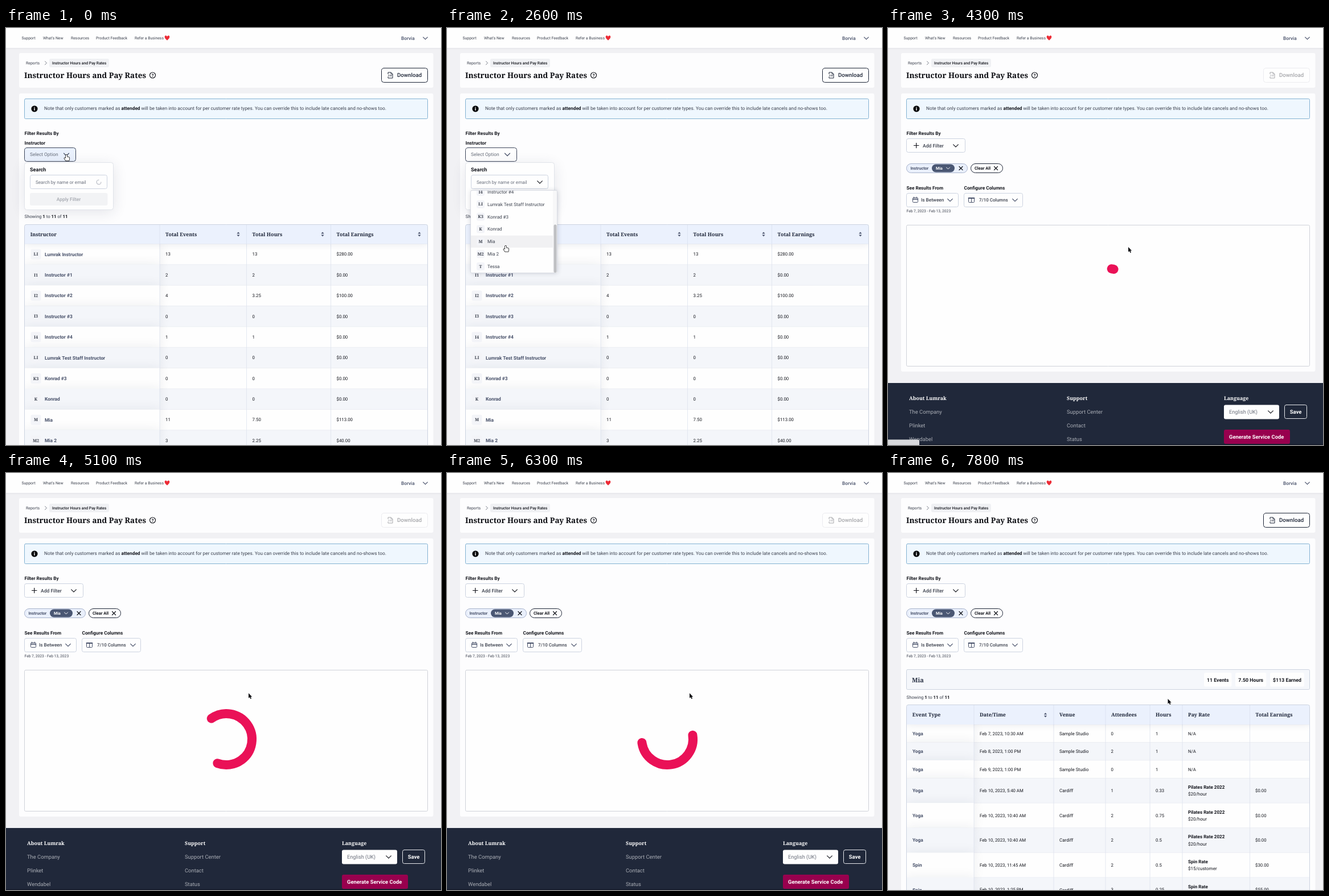
Animation, 764 px wide and 733 px high, one loop 7900 ms. Source, as an HTML page with a canvas:

```html
<!DOCTYPE html>
<html lang="en">
<head>
<meta charset="utf-8">
<title>Instructor Hours and Pay Rates</title>
<style>
html, body { margin: 0; width: 100%; height: 100%; overflow: hidden; background: #f1f1f4; }
canvas { display: block; width: 764px; height: 733px; }
</style>
</head>
<body>
<canvas id="stage" width="764" height="733"></canvas>
<script>
const c = document.getElementById('stage').getContext('2d');
c.textRendering = 'geometricPrecision';
c.lineCap = c.lineJoin = 'round';

const LOOP = 7900, PAGE = 4200, DONE = 6900;
const INK = '#14161d', SOFT = '#3b404d', SLATE = '#475069', NAVY = '#1c2436', EDGE = '#ccd3e0', STRIPE = '#f4f6fa';
const PICK = 'Mia';

const smooth = x => x * x * (3 - 2 * x);
const clamp = x => Math.max(0, Math.min(1, x));

// --- drawing helpers; y is the middle of the capitals ---
function text(s, x, y, size = 8, color = INK, weight = 400, align = 'left', family = 'Roboto, sans-serif') {
  c.font = `${weight} ${size}px ${family}`;
  c.fillStyle = color;
  c.textAlign = align;
  c.fillText(s, x, y + size * .355);
  return c.measureText(s).width;
}
const slab = (s, x, y, size = 8.9, color = INK, align, weight = 700) =>
  text(s, x, y, size, color, weight, align, '"Noto Serif", serif');

// Parts alternate between regular and bold.
function rich(parts, x, y, size) {
  parts.forEach((s, i) => x += text(s, x, y, size, i % 2 ? INK : SOFT, i % 2 ? 700 : 400));
}
// Outlined boxes sit on pixel centres so that their edges stay crisp.
function box(x, y, x2, y2, fill, edge, r = 3) {
  if (edge) [x, y, x2, y2] = [x, y, x2, y2].map(v => Math.ceil(v) - .5);
  c.beginPath();
  c.roundRect(x, y, x2 - x, y2 - y, r);
  if (fill) { c.fillStyle = fill; c.fill(); }
  if (edge) { c.strokeStyle = edge; c.lineWidth = 1; c.stroke(); }
}
function shadowed(blur, alpha, draw, drop = 0) {
  c.save();
  c.shadowColor = `rgba(30,40,70,${alpha})`;
  c.shadowBlur = blur;
  c.shadowOffsetY = drop;
  draw();
  c.restore();
}
function line(points, color = INK, width = 1.2) {
  c.beginPath();
  points.forEach(([x, y]) => c.lineTo(x, y));
  c.strokeStyle = color;
  c.lineWidth = width;
  c.stroke();
}
function arc(x, y, r, from, to, color, width) {
  c.beginPath();
  c.arc(x, y, r, from, to);
  c.strokeStyle = color;
  c.lineWidth = width;
  c.stroke();
}
const chevron = (x, y, w = 4.3, color = INK, width) =>
  line([[x - w, y - w / 2], [x, y + w / 2], [x + w, y - w / 2]], color, width);
function cross(x, y, r = 3) {
  line([[x - r, y - r], [x + r, y + r]]);
  line([[x + r, y - r], [x - r, y + r]]);
}
function sortIcon(x, y) {
  c.fillStyle = SLATE;
  for (const d of [-1, 1]) {
    c.beginPath();
    c.moveTo(x - 2.6, y + d);
    c.lineTo(x + 2.6, y + d);
    c.lineTo(x, y + d * 4);
    c.fill();
  }
}

// Striped rows whose first cell and header float above the rest.
function grid(top, heights, dividers, heads) {
  const head = top + 34, right = dividers[0];
  const rows = heights.map((h, i) => [head + heights.slice(0, i).reduce((a, b) => a + b, 0), h, i % 2 ? STRIPE : '#fefefe']);
  c.save();
  c.beginPath();
  c.rect(33, top, 707.5, 733 - top);
  c.clip();
  for (const [y, h, fill] of rows) {
    box(33, y, 741, y + h, fill, null, 0);
    line([[33, y], [741, y]], '#e6e9ef', .7);
  }
  for (const [y, h, fill] of rows) shadowed(20, .08, () => box(33, y, right, y + h, fill, null, 0));
  for (const x of dividers) line([[x, head], [x, 733]], '#dde3ee', .8);
  shadowed(14, .1, () => box(33, top, 741, head, '#ebf1fd', null, [3, 3, 0, 0]));
  for (const x of dividers) line([[x, top], [x, head]], '#dae1ef', .8);
  c.restore();
  box(33, top, 741, 760, null, EDGE);
  heads.forEach((s, k) => slab(s, k ? dividers[k - 1] + 10 : 42.7, top + 17.2, 8.85, NAVY));
  return rows.map(([y, h]) => y + h / 2);
}

// --- parts common to all screens ---
function frameTop(ready, cardEnd) {
  c.fillStyle = '#f1f1f4';
  c.fillRect(0, 0, 764, 733);
  shadowed(4, .12, () => { c.fillStyle = '#fefefe'; c.fillRect(-9, -9, 782, 44); });
  [['Support', 27.5], ["What's New", 65], ['Resources', 114], ['Product Feedback', 158], ['Refer a Business', 226]]
    .forEach(([s, x]) => text(s, x, 17.5, 6.85, SOFT));
  c.fillStyle = '#ed2b36';
  c.beginPath();
  c.moveTo(283, 21.8);
  c.bezierCurveTo(275, 16, 280, 10.5, 283, 15);
  c.bezierCurveTo(286, 10.5, 291, 16, 283, 21.8);
  c.fill();
  text('Borvia', 694, 18, 8.3, SLATE, 500);
  chevron(736.5, 18, 3.8, SLATE);

  box(23, 44, 750.5, 105, '#fdfdfe');
  box(23, 115, 750.5, cardEnd, '#fdfdfe');
  text('Reports', 35, 61.5, 6.95, SOFT);
  line([[68.5, 58.5], [71.5, 61.5], [68.5, 64.5]], '#777c88', 1);
  box(76, 54, 181, 69, '#f0f1f4');
  text('Instructor Hours and Pay Rates', 81, 61.5, 6.85, INK, 500);
  slab('Instructor Hours and Pay Rates', 32, 83.5, 13.5, '#0a0b10');
  arc(257.5, 83, 5, 0, 7, INK, 1.2);
  text('?', 257.5, 83.2, 7.5, INK, 700, 'center');

  const tone = ready ? NAVY : '#a6a7ab';
  box(659.5, 71, 741, 95.5, '#fefefe', ready ? NAVY : '#ececf0', 4);
  line([[671, 81], [671, 78], [676, 78], [679, 81], [679, 88], [671, 88], [671, 86]], tone, 1);
  line([[676, 78], [676, 81], [679, 81]], tone, .8);
  text('CSV', 674.5, 84, 3.6, tone, 700, 'center');
  text('Download', 687, 83, 9.7, tone, 500);

  box(33, 124.5, 741, 159.5, '#eff7fe', '#83b2d2', 2);
  c.fillStyle = '#050608';
  c.beginPath();
  c.arc(50, 142, 5.6, 0, 7);
  c.fill();
  text('i', 50, 142, 8.5, '#fff', 900, 'center');
  rich(['Note that only customers marked as ', 'attended',
    ' will be taken into account for per customer rate types. You can override this to include late cancels and no-shows too.'],
    67, 141, 8.29);
  text('Filter Results By', 32.5, 185, 8.2, INK, 700);
}
const showing = y => rich(['Showing ', '1', ' to ', '11', ' of ', '11'], 32.5, y, 7.8);

// --- first screen: all instructors ---
const people = ['Lumrak Instructor', 'Instructor #1', 'Instructor #2', 'Instructor #3', 'Instructor #4',
  'Lumrak Test Staff Instructor', 'Konrad #3', 'Konrad', PICK, PICK + ' 2', 'Tessa'];
const initials = ['LI', 'I1', 'I2', 'I3', 'I4', 'LI', 'K3', 'K', 'M', 'M2', 'T'];
const totals = ['13 13 $280.00', '2 2 $0.00', '4 3.25 $100.00', '0 0 $0.00', '1 1 $0.00',
  '0 0 $0.00', '0 0 $0.00', '0 0 $0.00', '11 7.50 $113.00', '3 2.25 $40.00'];

function badge(i, x, y, size = 18) {
  box(x - size / 2, y - size / 2, x + size / 2, y + size / 2, '#f3f4f8');
  slab(initials[i], x, y, 7.4, SOFT, 'center');
}

function instructorTable() {
  showing(331.5);
  const dividers = [270, 422.5, 570.5];
  const rows = grid(345.5, totals.map(() => 36.37), dividers,
    ['Instructor', 'Total Events', 'Total Hours', 'Total Earnings']);
  for (const x of [408, 556, 726]) sortIcon(x, 362.5);
  rows.forEach((y, i) => {
    badge(i, 52.5, y);
    text(people[i], 68, y, 8.4, SLATE, 600);
    totals[i].split(' ').forEach((s, k) => text(s, dividers[k] + 10, y, 7.85));
  });
}

function filterPanel(t, open, picked, pointer) {
  text('Instructor', 32.5, 202, 8.3, INK, 700);
  box(33, 210.5, 122.5, 234.5, t < 900 ? '#eaf1fd' : '#fefefe', '#3d465b', 4);
  text('Select Option', 42, 222.5, 8.4, '#676d7a');
  chevron(106, 222.5, 4.5, SLATE);

  shadowed(24, .12, () => box(33, 237, 188.5, 319.5, '#fefefe', null, 4), 4);
  box(33, 237, 188.5, 319.5, null, '#e1e4ea', 4);
  text('Search', 42, 249, 9.1, INK, 700);
  box(42.5, 259, 178, 283, '#fefefe', EDGE);
  if (picked) {
    badge(8, 59, 271, 13);
    text(PICK, 71, 271, 8.2, SOFT);
    cross(163, 271, 3.2);
  } else {
    text('Search by name or email', 52, 271, 8.1, '#696f7c');
    if (t < 1200) arc(163, 271, 3.9, t / 110, t / 110 + 4.7, '#a9adb8', 1);
    else chevron(163, 271, 4.3);
  }
  box(42, 290, 178.5, 312, picked ? '#020c22' : '#f2f3f5');
  text('Apply Filter', 110, 301, 8.45, picked ? '#fff' : '#a5a8b0', 500, 'center');
  if (open) optionList(t, pointer);
}

function optionList(t, pointer) {
  const scroll = smooth(clamp((t - 1700) / 700));
  shadowed(8, .2, () => box(42, 286, 194, 431, '#fefefe', null, 2));
  c.save();
  c.beginPath();
  c.rect(42, 286, 152, 145);
  c.clip();
  people.forEach((name, i) => {
    const y = 298.7 + i * 21.83 - scroll * 98;
    if (Math.abs(y - pointer) < 10.9) box(42, y - 10.7, 186, y + 10.7, '#f1f1f3', null, 0);
    badge(i, 59, y, 14);
    text(name, 71, y, 8.1, SOFT);
  });
  box(186, 286, 194, 431, '#f7f7f8', null, 0);
  box(187.5, 286.5 + scroll * 59, 192.5, 371 + scroll * 59, '#bfc0c3', null, 2.5);
  c.restore();
  box(42, 286, 194, 431, null, '#d9dce3', 2);
}

// --- second screen: filter chosen ---
function filterBar() {
  box(33, 194.5, 135.5, 218.5, '#fefefe', EDGE);
  line([[45.5, 206.5], [54, 206.5]]);
  line([[49.7, 202.3], [49.7, 210.7]]);
  text('Add Filter', 61, 207, 8.5, SOFT, 500);
  chevron(119, 207, 4.3);

  box(33, 238.5, 139.5, 254.5, '#eaf0fc', '#a7b2cb', 8);
  text('Instructor', 39.5, 246.5, 7.2, SLATE, 700);
  box(77, 239.5, 117, 253.5, '#4a5773', null, 7);
  text(PICK, 84, 246.5, 7, '#fff', 700);
  chevron(105.5, 246.5, 3, '#fff', 1);
  cross(128, 246.5);
  box(145.5, 238.5, 201.5, 254.5, '#fefefe', NAVY, 8);
  text('Clear All', 152, 246.5, 7.4, INK, 700);
  cross(189.5, 246.5);

  text('See Results From', 32.5, 281, 8.2, INK, 700);
  text('Configure Columns', 133.5, 281, 8.3, INK, 700);
  box(33, 290.5, 123.5, 314.5, '#fefefe', EDGE);
  box(43.5, 298.5, 52.5, 306.5, null, SLATE, 1);
  line([[43.5, 301], [52.5, 301]], SLATE, 1.5);
  for (const x of [45.5, 50.5]) line([[x, 296.8], [x, 299]], SLATE, 1);
  text('Is Between', 58, 302.5, 8.2, SOFT, 500);
  chevron(109, 302.5, 4.3, SLATE);
  box(133.5, 290.5, 236.5, 314.5, '#fefefe', EDGE);
  box(141.5, 298.5, 152, 306.5, null, SLATE, 1);
  line([[141.5, 299], [151.5, 299]], SLATE, 1.8);
  line([[146.5, 299], [146.5, 306]], SLATE, 1);
  text('7/10 Columns', 160, 302.5, 8, SOFT, 500);
  chevron(223, 302.5, 4.3, SLATE);
  text('Feb 7, 2023 - Feb 13, 2023', 32.5, 322, 6.7, SOFT);
}

function loader(t) {
  const s = (t - 4270) / 1000;
  if (s < 0) return;
  const half = s / .76 % 2, grow = smooth(Math.min(half, 1)), fall = smooth(Math.max(half - 1, 0));
  const base = -88 + 142.6 * s, rad = Math.PI / 180;
  const tail = base + 200 * grow + 160 * fall, head = base + 4 + 438 * grow - 80 * fall;
  arc(387, 468, 45, tail * rad, Math.max(head, tail + 2) * rad, '#ea1157', 16);
}

function footer() {
  c.fillStyle = '#20283a';
  c.fillRect(0, 624, 764, 109);
  c.fillStyle = '#141a2a';
  c.fillRect(0, 731.5, 764, 2);
  const cols = [[37, 'About Lumrak', 'The Company', 'Plinket', 'Wendabel'],
    [314, 'Support', 'Support Center', 'Contact', 'Status']];
  for (const [x, title, ...links] of cols) {
    slab(title, x, 651, 8.9, '#fff');
    links.forEach((s, i) => text(s, x, 675 + i * 24, 9.4, '#a9adb5'));
  }
  slab('Language', 590, 651, 8.9, '#fff');
  box(590, 662.5, 687, 687.5, '#fefefe');
  text('English (UK)', 599, 675, 9.2, '#6a6f7b');
  chevron(672, 675, 4.3);
  box(697, 663, 736, 687, null, '#e6e8ec');
  text('Save', 716, 675, 9.5, '#fff', 700, 'center');
  box(590, 706, 706, 731, '#98004e');
  text('Generate Service Code', 599, 718.5, 9.4, '#fff', 700);
}

// --- third screen: events of one instructor ---
const events = [
  ['Yoga', 'Feb 7, 2023, 10:30 AM', 0, '1'],
  ['Yoga', 'Feb 8, 2023, 1:00 PM', 2, '1'],
  ['Yoga', 'Feb 9, 2023, 1:00 PM', 0, '1'],
  ['Yoga', 'Feb 10, 2023, 5:40 AM', 1, '0.33', '$0.00'],
  ['Yoga', 'Feb 10, 2023, 10:40 AM', 2, '0.75', '$0.00'],
  ['Yoga', 'Feb 10, 2023, 10:40 AM', 2, '0.5', '$0.00'],
  ['Spin', 'Feb 10, 2023, 11:45 AM', 2, '0.5', '$30.00'],
  ['Spin', 'Feb 10, 2023, 1:25 PM', 3, '0.25', '$55.00']
];

function results() {
  box(33, 346, 741, 381, '#f5f7fb', EDGE, 2);
  slab(PICK, 42, 364, 11, '#2b3346', 'left', 600);
  [['11 Events', 555, 603.5], ['7.50 Hours', 610, 664.5], ['$113 Earned', 671, 731]].forEach(([s, x, x2]) => {
    box(x, 351, x2, 375.5, '#fefefe');
    text(s, (x + x2) / 2, 363.5, 8.8, INK, 700, 'center');
  });
  showing(394.5);
  const rows = grid(408, events.map(e => e[4] ? 43.6 : 31.5), [151, 291, 382, 460, 517, 635.5],
    ['Event Type', 'Date/Time', 'Venue', 'Attendees', 'Hours', 'Pay Rate', 'Total Earnings']);
  sortIcon(276.5, 425.5);
  events.forEach(([type, date, count, hours, earned], i) => {
    const y = rows[i], yoga = type === 'Yoga';
    text(type, 43, y, 8.3, SLATE, 700);
    text(date, 161, y, 7.8);
    text(earned ? 'Cardiff' : 'Sample Studio', 301, y, 8);
    text(count, 391.5, y, 7.8);
    text(hours, 470, y, 7.8);
    if (earned) {
      text(yoga ? 'Pilates Rate 2022' : 'Spin Rate', 527, y - 6, 8.1, INK, 700);
      text(yoga ? '$20/hour' : '$15/customer', 527, y + 6.3, 8);
      text(earned, 645, y, 7.8);
    } else text('N/A', 527, y, 7.8);
  });
}

// --- pointer ---
const path = [[0, 107, 228], [500, 107, 228], [1000, 140, 272], [1500, 138, 275], [1900, 106, 340], [2400, 104, 388],
  [3100, 104, 388], [3700, 101, 303], [4000, 101, 303], [4300, 422, 385], [4700, 426, 387], [6900, 426, 387], [7800, 491.5, 397]];

function pointerAt(t) {
  const i = path.findIndex(k => k[0] > t);
  if (i < 0) return path[path.length - 1].slice(1);
  const [t0, x0, y0] = path[i - 1], [t1, x1, y1] = path[i];
  const p = smooth((t - t0) / (t1 - t0));
  return [x0 + (x1 - x0) * p, y0 + (y1 - y0) * p];
}
const hand = new Path2D('M-2 1 V-4.5 Q-1-6 0-4.5 V-1.5 L3.5-.7 Q4.5-.3 4.4 1 L3.6 5 H-2 L-4.6 1.4 Q-4.4 0-3.2.5Z');
const arrow = new Path2D('M0 0 V8.8 L2 7 L3.5 10.2 L5 9.5 L3.6 6.4 H6.2Z');

function pointer(x, y, shape, fill, edge) {
  c.save();
  c.translate(x, y);
  c.fillStyle = fill;
  c.strokeStyle = edge;
  c.lineWidth = 1.5;
  c.stroke(shape);
  c.fill(shape);
  c.restore();
}

function draw(t) {
  const [x, y] = pointerAt(t), loading = t >= PAGE && t < DONE;
  frameTop(!loading, loading ? 604 : 740);
  if (t < PAGE) {
    instructorTable();
    filterPanel(t, t >= 1400 && t < 3100, t >= 3100, y - 6);
    pointer(x, y, hand, '#fff', '#111');
    return;
  }
  filterBar();
  if (loading) {
    box(33, 346.5, 741, 595, '#fefefe', '#cfd2d9', 2);
    loader(t);
    footer();
    if (t < 4600) box(-2, 723.5, 55, 735, '#d8d9dc', null, 3);
  } else results();
  pointer(x, y, arrow, '#0b0c10', '#fff');
}

const start = performance.now();
function tick() {
  const t = (performance.now() - start) % LOOP;
  draw(Math.floor(t / 100) * 100); // ten steps a second
  requestAnimationFrame(tick);
}
tick();
</script>
</body>
</html>
```
